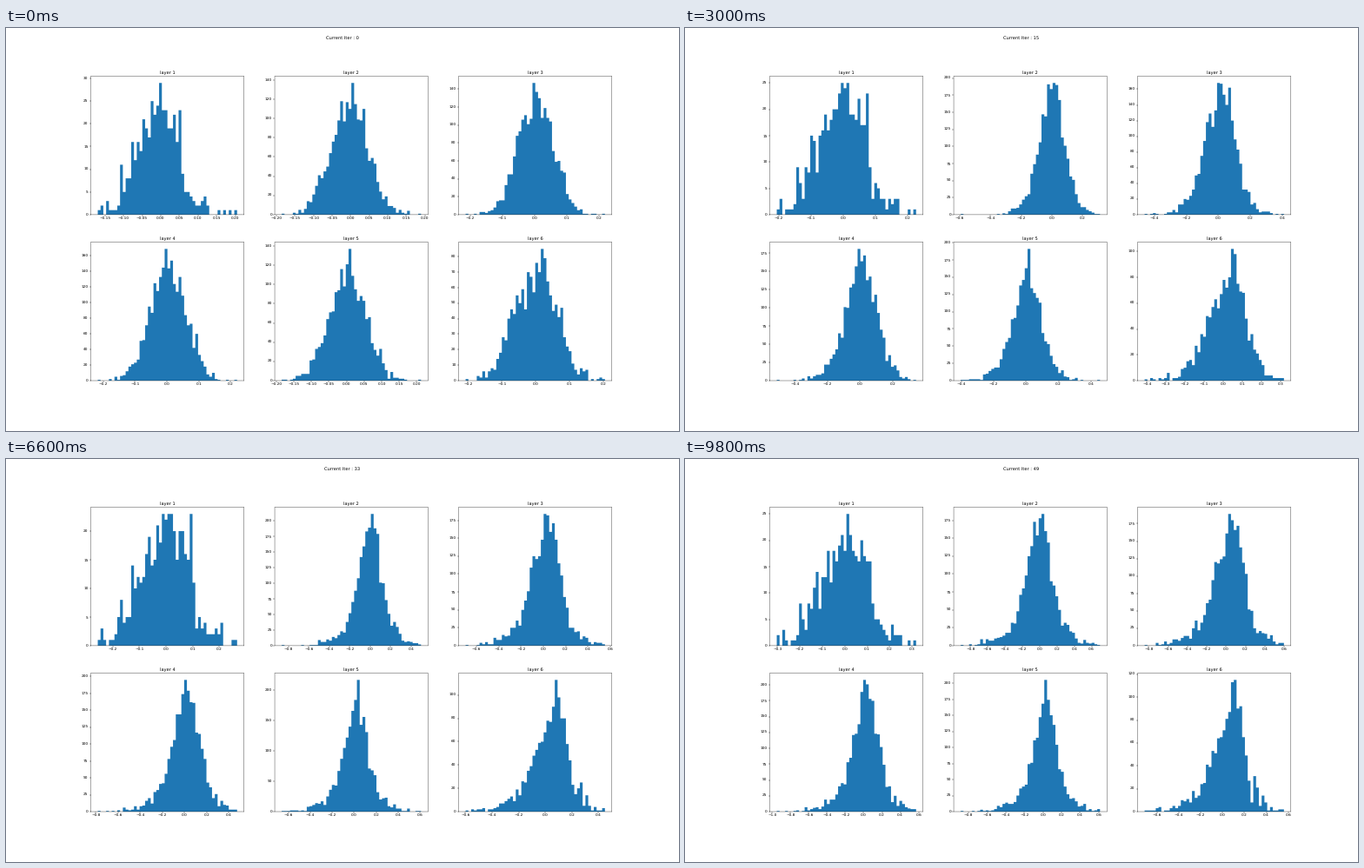
These frames come from a looping animation (774x464 px, 10000 ms). A matplotlib script:

```python
import numpy as np
import matplotlib.pyplot as plt
from matplotlib.animation import FuncAnimation

DPI = 30.96
FRAMES, STEP_MS, BINS = 50, 200, 50
WIDE_SHARE = 0.36       # share of weights that drift into the heavy tails

plt.rcParams.update({"font.family": "DejaVu Sans", "path.snap": False,
                     "text.hinting": "none"})


def track(points, s):
    """Smooth curve through the values at the start, middle and end."""
    a, b, c = points
    return (2 * a * (s - 0.5) * (s - 1) + 4 * b * s * (1 - s)
            + 2 * c * s * (s - 0.5))


class Layer:
    """Seeded weights that spread out, skew and grow tails while training."""

    def __init__(self, number, count, lo, hi, top, center, sigma, skew, tail):
        self.number = number
        self.lo, self.hi, self.top = lo, hi, top
        self.center, self.sigma = center, sigma
        self.skew, self.tail = skew, tail
        rng = np.random.default_rng(number)
        self.z = rng.normal(size=count)
        self.wide = rng.random(count) < WIDE_SHARE

    def weights(self, s):
        grow = 1 - (1 - s) ** 2
        z = self.z * (1 + self.wide * self.tail * grow)
        lean = 1 - self.skew * grow * np.tanh(z)
        return track(self.center, s) + track(self.sigma, s) * z * lean

    def histogram(self, i):
        s = i / (FRAMES - 1)
        lo, hi, top = (track(p, s) for p in (self.lo, self.hi, self.top))
        h, edges = np.histogram(self.weights(s), BINS, (lo, hi))
        h[[0, -1]] = np.maximum(h[[0, -1]], 1)      # the extremes set the range
        return np.round(h * round(top) / h.max()), edges


LAYERS = [
    Layer(1, 430, lo=(-.169, -.232, -.303), hi=(.205, .245, .318),
          top=(29, 23.5, 25), center=(-.004, .003, .008),
          sigma=(.062, .094, .117), skew=.05, tail=0),
    Layer(2, 2000, lo=(-.186, -.768, -.913), hi=(.19, .407, .698),
          top=(137, 209, 184), center=(0, .005, 0),
          sigma=(.05, .085, .127), skew=.03, tail=1.3),
    Layer(3, 2000, lo=(-.214, -.595, -.844), hi=(.218, .498, .599),
          top=(147, 178, 189), center=(.002, .014, .03),
          sigma=(.055, .098, .13), skew=.12, tail=1.2),
    Layer(4, 2000, lo=(-.217, -.665, -.95), hi=(.22, .416, .573),
          top=(169, 188, 208), center=(.003, .01, .022),
          sigma=(.056, .095, .118), skew=.1, tail=1.3),
    Layer(5, 2000, lo=(-.184, -.539, -.885), hi=(.212, .555, .614),
          top=(137, 210, 205), center=(.002, .007, .02),
          sigma=(.053, .088, .108), skew=.05, tail=1.3),
    Layer(6, 1250, lo=(-.207, -.519, -.712), hi=(.204, .388, .561),
          top=(85, 109, 115), center=(0, .036, .063),
          sigma=(.061, .093, .115), skew=.16, tail=1.2),
]

fig, axes = plt.subplots(2, 3, figsize=(25, 464 / DPI), dpi=DPI)
fig.subplots_adjust(left=0.126, right=0.9003, bottom=0.125, top=0.88,
                    wspace=0.2, hspace=0.2)
title = fig.suptitle("")
views = []
for layer, ax in zip(LAYERS, axes.flat):
    ax.set_title(f"layer {layer.number}")
    bars = ax.stairs(*layer.histogram(0), fill=True, color="C0")
    views.append((layer, ax, bars))


def draw(i):
    title.set_text(f"Current Iter : {i}")
    for layer, ax, bars in views:
        h, edges = layer.histogram(i)
        bars.set_data(h, edges)
        pad = 0.05 * (edges[-1] - edges[0])
        ax.set_xlim(edges[0] - pad, edges[-1] + pad)
        ax.set_ylim(0, 1.05 * h.max())
    return []


anim = FuncAnimation(fig, draw, frames=FRAMES, interval=STEP_MS,
                     repeat=True, repeat_delay=0, blit=False)
plt.show()
```
